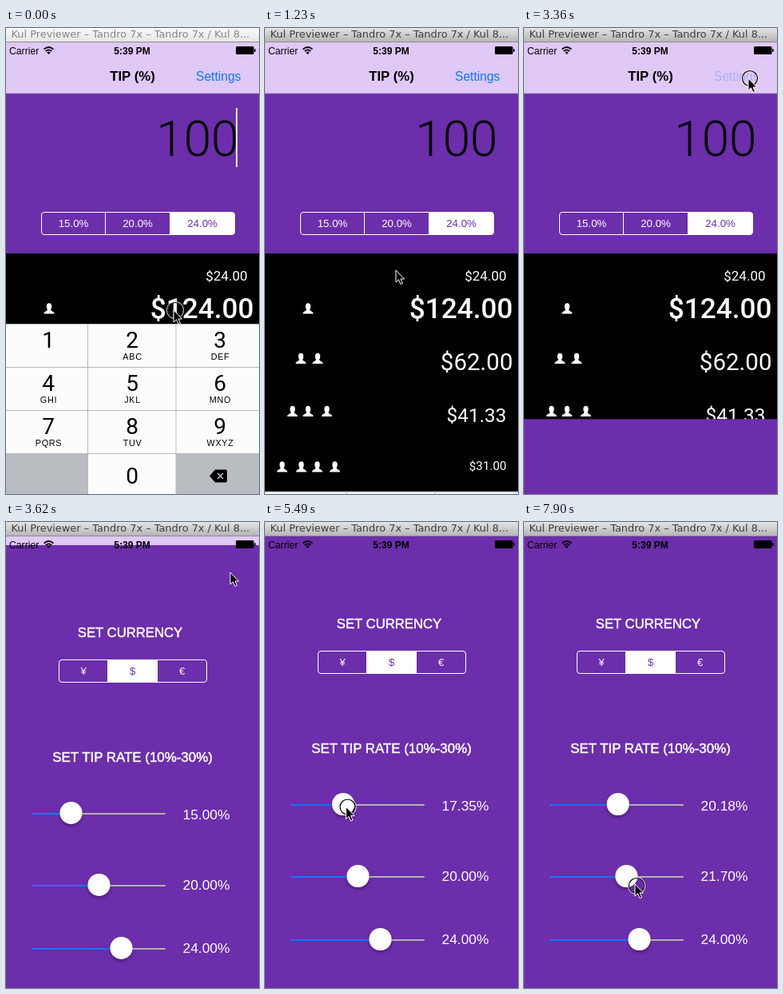
Recreate the animation shown at these times as an HTML page. Size 317 by 583 pixels, loop 7.99 s.

```html
<!DOCTYPE html>
<html lang="en">
<head>
<meta charset="utf-8">
<title>Tip calculator</title>
<style>
  html, body { margin: 0; width: 100%; height: 100%; overflow: hidden; background: #6c2eab; }
  svg { display: block; width: 317px; height: 583px; }
  text { font-family: "Liberation Sans", Arial, sans-serif; white-space: pre; }
  .mid { text-anchor: middle; }
  .end { text-anchor: end; }
  .bold { font-weight: bold; }
  .medium { stroke: #fff; stroke-width: .5; }
  .digits { font-family: Roboto, "Liberation Sans", sans-serif; }
  .light { font-weight: 300; }
  .strong { font-weight: 500; }
  .sub { font-size: 10.8px; letter-spacing: .7px; }
  #title { font: 12.9px "DejaVu Sans", sans-serif; }
</style>
</head>
<body>
<svg id="stage" viewBox="0 0 317 583" xmlns="http://www.w3.org/2000/svg"></svg>
<script>
const PURPLE = '#6c2eab', LOOP = 7990, TICK = 88.7, LAST_TICK = 89;

const text = (x, y, size, str, cls = '', fill = '#fff') =>
  `<text x="${x}" y="${y}" font-size="${size}" class="${cls}" fill="${fill}">${str}</text>`;
const rect = (x, y, w, h, fill, extra = '') =>
  `<rect x="${x}" y="${y}" width="${w}" height="${h}" fill="${fill}" ${extra}/>`;

// Segmented control: edges are the x positions of borders and dividers.
function segmented(edges, y, height, labels, selected, size) {
  const [left, right] = [edges[0], edges[edges.length - 1]];
  let out = rect(edges[selected], y, edges[selected + 1] - edges[selected], height, '#fff',
    selected === labels.length - 1 ? 'rx="3.5"' : '');
  if (selected === labels.length - 1) out += rect(edges[selected], y, 8, height, '#fff');
  out += rect(left, y, right - left, height, 'none', 'rx="3.5" stroke="#fff"');
  labels.forEach((label, i) => {
    if (i) out += rect(edges[i] - .5, y, 1, height, '#fff');
    out += text((edges[i] + edges[i + 1]) / 2, y + 18.7, size, label, 'mid', i === selected ? PURPLE : '#fff');
  });
  return out;
}

const person = (x, y) => `<g transform="translate(${x} ${y})" fill="#fff">
  <ellipse cy="-2.5" rx="3.2" ry="4.2"/>
  <path d="M-6.5 6.5C-6.5 3 -2 3.6 -2 1H2C2 3.6 6.5 3 6.5 6.5Z"/></g>`;

function tipPage() {
  const people = [[351, 54], [413.5, 45, 66], [479.5, 34.5, 54, 77.5], [549, 21.5, 45.5, 65.5, 87.5]];
  return rect(0, 18, 317, 64, '#e0c8f7') + rect(0, 82, 317, 200, PURPLE) +
    rect(0, 81.5, 317, .7, '#a98bc8') + rect(0, 282, 317, 301, '#000') +
    text(158.5, 66, 16.8, 'TIP (%)', 'mid bold', '#000') +
    `<g id="settings">${text(238, 66, 15.6, 'Settings', '', 'currentColor')}</g>` +
    text(291.5, 159.5, 62, '100', 'end digits light', '#000') +
    rect(288, 100, 2, 74, '#fff', 'id="caret"') +
    segmented([44.5, 124.5, 205.5, 286.5], 230.5, 28, ['15.0%', '20.0%', '24.0%'], 2, 13.3) +
    text(302.5, 315.5, 17, '$24.00', 'end digits') +
    text(310.5, 362.5, 35.2, '$124.00', 'end digits strong') +
    text(310.5, 428, 29.5, '$62.00', 'end digits') +
    text(302.5, 492.5, 24.4, '$41.33', 'end digits') +
    text(302.5, 553, 15.2, '$31.00', 'end digits') +
    people.map(([y, ...xs]) => xs.map(x => person(x, y)).join('')).join('');
}

function keypad() {
  const letters = ['', 'ABC', 'DEF', 'GHI', 'JKL', 'MNO', 'PQRS', 'TUV', 'WXYZ'];
  const centers = [53, 158, 268], line = '#b4b8bc';
  let out = rect(0, 370, 317, 213, '#fcfcfc') + rect(0, 532, 102.5, 51, '#b9bdc2') +
    rect(213, 532, 104, 51, '#b9bdc2');
  for (const x of [102, 212.5]) out += rect(x, 370, 1, 213, line);
  for (const y of [370, 424, 478, 532]) out += rect(0, y, 317, 1, line);
  letters.forEach((word, i) => {
    const x = centers[i % 3], y = 400 + 54 * Math.floor(i / 3);
    out += text(x, y, 28, i + 1, 'mid digits', '#000') + text(x + .5, y + 15, 10.8, word, 'mid sub', '#000');
  });
  return out + text(158, 570, 28, '0', 'mid digits', '#000') +
    `<path d="M255 560.5L262 552.5H275Q277 552.5 277 554.5V566.5Q277 568.5 275 568.5H262Z"/>
     <path d="M265 557L272 564M272 557L265 564" stroke="#b9bdc2" stroke-width="1.6"/>`;
}

const slider = ([y, baseline], i) => rect(33, y, 167, 2, '#b4b4b4', 'rx="1"') +
  rect(33, y, 50, 2, '#0a78ff', `id="fill${i}" rx="1"`) +
  `<circle id="thumb${i}" cy="${y}" r="14" fill="#fff" filter="url(#shadow)"/>` +
  `<text id="value${i}" x="280.5" y="${baseline}" class="end" font-size="17.4" fill="#fff"></text>`;

const settingsPage = () => rect(0, 18, 317, 565, PURPLE) +
  text(155.5, 133.4, 16.7, 'SET CURRENCY', 'mid medium') +
  segmented([66.5, 127.5, 189.5, 251.5], 161.5, 28, ['¥', '$', '€'], 1, 13) +
  text(158.5, 289, 16.9, 'SET TIP RATE (10%-30%)', 'mid medium') +
  [[353, 361], [443, 449], [522, 528]].map(slider).join('');

const statusBar = () => text(4, 32.5, 12.2, 'Carrier', '', '#000') +
  text(158, 32.5, 12, '5:39 PM', 'mid bold', '#000') +
  `<g fill="none" stroke="#000" stroke-width="1.8">
     <path d="M47.5 26.6Q53.5 21.4 59.5 26.6M49.8 29Q53.5 25.8 57.2 29"/></g>
   <path d="M51.3 30.4Q53.5 28.6 55.7 30.4L53.5 33Z"/>` +
  rect(288, 23, 22.5, 10, '#000', 'rx="1.5"') + rect(311, 26, 1.6, 4, '#000', 'rx=".8"');

const gradient = (id, top, bottom) => `<linearGradient id="${id}" x2="0" y2="1">
  <stop stop-color="${top}"/><stop offset="1" stop-color="${bottom}"/></linearGradient>`;

document.getElementById('stage').innerHTML = `<defs>
    ${gradient('idle', '#fafafa', '#e6e6e6')}${gradient('active', '#e4e4e4', '#b6b6b6')}
    <filter id="shadow" x="-30%" y="-30%" width="160%" height="170%">
      <feDropShadow dx="0" dy="2.5" stdDeviation="2" flood-opacity=".35"/></filter>
  </defs>
  ${tipPage()}<g id="keypad">${keypad()}</g><g id="page">${settingsPage()}</g>${statusBar()}
  ${rect(0, 0, 317, 17, '', 'id="bar"')}${rect(0, 17, 317, 1, '#8c8c8c')}
  <text id="title" x="6.5" y="12">Kul Previewer – Tandro 7x – Tandro 7x / Kul 8...</text>
  <g id="pointer">
    <g id="press" fill="none"><circle r="10" stroke="#fff" stroke-opacity=".75" stroke-width="2.2"/>
      <circle r="9.5" stroke="#000" stroke-width="1.2"/></g>
    <path d="M0 0V15L3.5 11.8L6 17.5L8.5 16.5L6 11H10.5Z" stroke="#fff" stroke-linejoin="round"/>
  </g>`;

const el = id => document.getElementById(id);
const show = (id, on) => el(id).setAttribute('visibility', on ? 'visible' : 'hidden');
const shift = (id, x, y) => el(id).setAttribute('transform', `translate(${x} ${y})`);

// Keys are [tick, value, ...]; values are interpolated linearly between them.
function sample(keys, tick) {
  const next = keys.findIndex(key => key[0] > tick);
  if (next < 0) return keys[keys.length - 1].slice(1);
  if (next === 0) return keys[0].slice(1);
  const a = keys[next - 1], b = keys[next], u = (tick - a[0]) / (b[0] - a[0]);
  return a.slice(1).map((v, i) => v + (b[i + 1] - v) * u);
}

// Remaining distance of a critically damped spring, 1 to 0.
function spring(ms) {
  const x = Math.max(0, ms) * .0197;
  return (1 + x) * Math.exp(-x);
}

const pointerPath = [
  [0, 210, 353], [5, 210, 353], [7, 164, 303], [14, 164, 303], [20, 290, 126], [26, 281, 63],
  [41, 281, 63], [47, 100, 341], [50, 83, 357], [57, 83, 357], [67, 120, 356], [73, 120, 356],
  [74, 126, 465], [76, 124, 507], [77, 124, 507], [80, 127, 453], [85, 127, 453], [89, 139, 453]
];
const presses = [[0, 0], [8, 10], [38, 38], [58, 73], [86, 89]];
const caretFade = [[0, 1], [1, .5], [2, 0], [5, 0], [6, .5], [7, 1], [10, 1], [11, 0]];
const rates = [[[57, 15], [68, 20.18]], [[85, 20], [89, 21.7]], [[0, 24]]];

function draw(ms) {
  const tick = Math.min(LAST_TICK, Math.floor((ms + 22) / TICK));
  const active = tick >= 11;
  el('bar').setAttribute('fill', `url(#${active ? 'active' : 'idle'})`);
  el('title').setAttribute('fill', active ? '#3c3c3c' : '#858585');
  el('caret').setAttribute('opacity', sample(caretFade, tick)[0]);
  el('settings').setAttribute('color', tick >= 38 ? '#a9b0f8' : '#0a78ff');

  shift('keypad', 0, active ? 213 * (1 - spring((tick - 11) * 88 + 50)) : 0);
  show('keypad', tick < 20);
  shift('page', 0, tick < 38 ? 565 : tick > 47 ? 0 : 565 * spring((tick - 38) * 87 + 37));
  show('page', tick >= 38);

  rates.forEach((keys, i) => {
    const rate = sample(keys, tick)[0], x = 81.5 + (rate - 15) * 7;
    el('thumb' + i).setAttribute('cx', x);
    el('fill' + i).setAttribute('width', x - 33);
    el('value' + i).textContent = rate.toFixed(2) + '%';
  });

  shift('pointer', ...sample(pointerPath, tick));
  shift('press', 2, tick >= 86 ? 2 : 0);
  show('press', presses.some(([from, to]) => tick >= from && tick <= to));
}

const start = performance.now();
function frame() {
  draw((performance.now() - start) % LOOP);
  requestAnimationFrame(frame);
}
frame();
</script>
</body>
</html>
```
